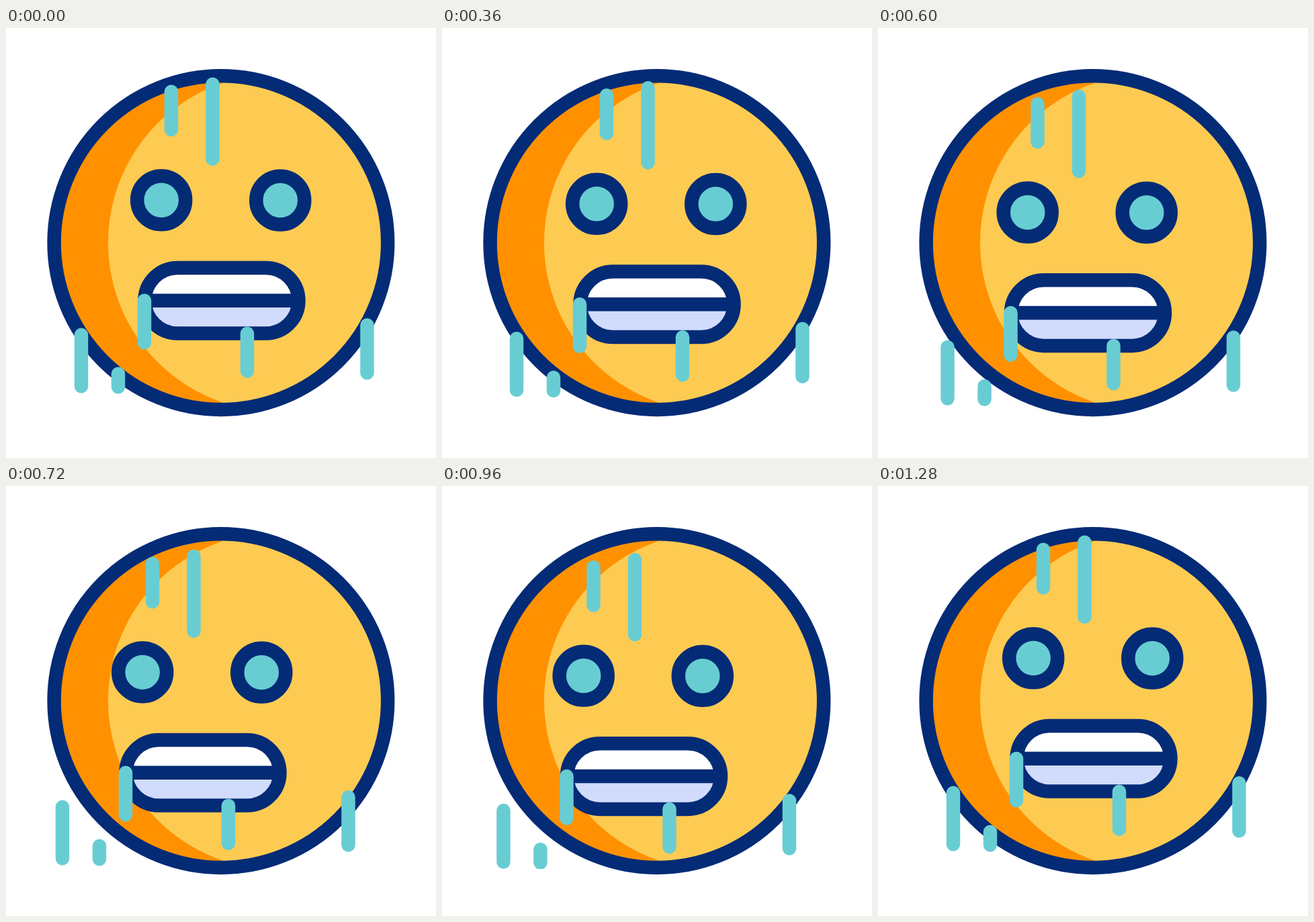
Recreate the animation shown at these times as an HTML page with a canvas. Size 640 px wide and 640 px high, loop 2 s.

```html
<!DOCTYPE html>
<html lang="en">
<head>
<meta charset="utf-8">
<title>Shivering face</title>
<style>
  html, body { margin: 0; width: 100%; height: 100%; overflow: hidden; background: #fff; }
  canvas { display: block; width: 100vw; height: 100vh; }
</style>
</head>
<body>
<canvas id="stage" width="640" height="640"></canvas>
<script>
const ctx = document.getElementById('stage').getContext('2d');
const NAVY = '#042b76', YELLOW = '#fecb52', ORANGE = '#ff9100', TEAL = '#68cdd3', LAVENDER = '#d1dbfc';
const LOOP = 2000, STEP = 40, LINE = 20.5;
const CX = 319.9, CY = 319.6;

// The features sway sideways while they sink, then slide home; one sway point per BEAT
const BEAT = 120, START = 120, LOW = 960, END = 1200;
const sway = [-6, -20.5, -1, 16, -8.5, -28, 8, -20.5, -13, 0];

const mix = (a, b, u) => a + (b - a) * u;
const ramp = (t, from, to) => Math.min(1, Math.max(0, (t - from) / (to - from)));

function offsetX(t) {
  const beat = (t - START) / BEAT, i = Math.floor(beat);
  return mix(sway[i], sway[i + 1], beat - i);
}

function offsetY(t) {
  const early = 7.7 * ramp(t, 80, 240) - 2.2 * ramp(t, 240, 360);
  const sink = 12.8 * ramp(t, 360, 600) + 8 * ramp(t, 600, LOW);
  return (early + sink) * (1 - ramp(t, LOW, END));
}

function circle(x, y, r, fill, stroke) {
  ctx.beginPath();
  ctx.arc(x, y, r, 0, Math.PI * 2);
  if (fill) { ctx.fillStyle = fill; ctx.fill(); }
  if (stroke) { ctx.strokeStyle = stroke; ctx.stroke(); }
}

function line(x1, y1, x2, y2, color) {
  ctx.strokeStyle = color;
  ctx.beginPath();
  ctx.moveTo(x1, y1);
  ctx.lineTo(x2, y2);
  ctx.stroke();
}

function drop(x, top, length) {
  ctx.lineCap = 'round';
  line(x, top + LINE / 2, x, top + length - LINE / 2, TEAL);
}

function drawHead() {
  ctx.save();
  ctx.beginPath();
  ctx.arc(CX, CY, 248, 0, Math.PI * 2);
  ctx.clip();
  ctx.fillStyle = YELLOW;
  ctx.fillRect(0, 0, 640, 640);
  ctx.fillStyle = ORANGE;
  ctx.fillRect(0, 0, 322, 640);
  circle(403, CY, 251, YELLOW);
  ctx.restore();
  circle(CX, CY, 248.3, null, NAVY);
}

function drawMouth() {
  const mouth = new Path2D();
  mouth.roundRect(206.5, 357, 229, 97.6, 48.8);
  ctx.save();
  ctx.clip(mouth);
  ctx.fillStyle = '#fff';
  ctx.fillRect(200, 350, 240, 56);
  ctx.fillStyle = LAVENDER;
  ctx.fillRect(200, 406, 240, 56);
  ctx.restore();
  line(207, 405.8, 435, 405.8, NAVY);
  ctx.stroke(mouth);
}

function drawDrops() {
  drop(246, 84.5, 77);
  drop(307.5, 73.5, 131.5);
  drop(206, 395.5, 83);
  drop(359, 444.5, 76.5);
  drop(537.5, 432, 91.5);
  drop(112, 446.5, 97);
  drop(167, 504.5, 40);
}

function draw(t) {
  ctx.fillStyle = '#fff';
  ctx.fillRect(0, 0, 640, 640);
  ctx.lineWidth = LINE;
  ctx.lineCap = 'butt';
  drawHead();

  ctx.save();
  ctx.beginPath();
  ctx.rect(0, 0, 640, 570);
  ctx.clip();
  if (t >= START && t < END) ctx.translate(offsetX(t), offsetY(t));
  circle(231.2, 256.2, 36, TEAL, NAVY);
  circle(408.3, 256.5, 36, TEAL, NAVY);
  drawMouth();
  drawDrops();
  ctx.restore();
}

function tick() {
  const t = performance.now() % LOOP;
  draw(Math.floor(t / STEP) * STEP);
  requestAnimationFrame(tick);
}
tick();
</script>
</body>
</html>
```
